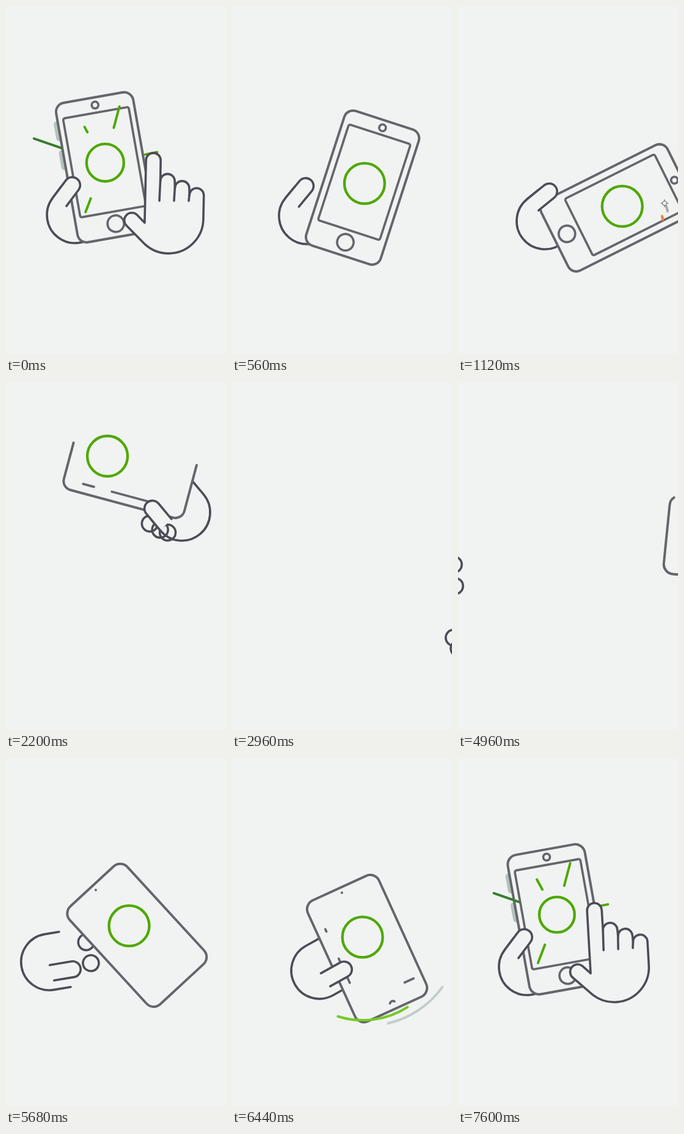
These frames come from a looping animation (360x568 px, 7640 ms). An HTML page with a canvas:

```html
<!DOCTYPE html>
<html>
<head>
<meta charset="utf-8">
<style>
html, body { margin: 0; width: 100%; height: 100%; overflow: hidden; background: #f0f3f2; }
canvas { display: block; }
</style>
</head>
<body>
<canvas id="stage" width="360" height="568"></canvas>
<script>
const ctx = document.getElementById('stage').getContext('2d');
const LOOP = 7640, RAD = Math.PI / 180;
const BG = '#f0f3f2', BODY = '#65666c', SKIN = '#4c4d57', GREEN = '#4fa800', LIME = '#76c926',
  FOREST = '#397d2d', ORANGE = '#f37f2c', MIST = '#d9e2de', SAGE = '#a4b5b0', ASH = '#c3cdc9';
const clamp = (v, a, b) => Math.max(a, Math.min(b, v));
const mix = (a, b, p) => a + (b - a) * p;
const ramp = (u, a, b) => { const p = clamp((u - a) / (b - a), 0, 1); return p * p * (3 - 2 * p); };

// Time runs from -4640 to 3000 with the tap near zero.
// Poses are [time, x, y, degrees], joined by monotone cubics.
const phonePoses = [[-2840, 560, 255, -95], [-2680, 450, 259, -84.3], [-1940, 214, 290, -42],
  [-1200, 221, 311, -24.6], [-500, 160, 263.3, -11.5], [0, 162.6, 263.3, -10],
  [1120, 261.6, 329.4, 63.4], [1600, 225, 160, 98], [2200, 206, 137, 105]];
const gripPoses = [[-2840, -130, 325, 0], [-2680, -72, 320, 0], [-1200, 143, 347, -29],
  [-500, 113, 341, -53], [200, 113, 341, -53], [1120, 142, 351, -39], [1600, -80, 436, -10]];

function at(keys, u) {
  const end = keys.length - 1;
  if (u <= keys[0][0]) return keys[0].slice(1);
  if (u >= keys[end][0]) return keys[end].slice(1);
  let i = 0;
  while (u >= keys[i + 1][0]) i++;
  const a = keys[i], b = keys[i + 1], h = b[0] - a[0], p = (u - a[0]) / h;
  const secant = (j, c) => (keys[j + 1][c] - keys[j][c]) / (keys[j + 1][0] - keys[j][0]);
  const slope = (j, c) => {
    if (j === 0 || j === end) return 0;
    const m = secant(j - 1, c), n = secant(j, c);
    return m * n <= 0 ? 0 : 2 * m * n / (m + n);
  };
  return a.slice(1).map((v, k) => {
    const c = k + 1, q = p * p, r = q * p;
    return (2 * r - 3 * q + 1) * v + (r - 2 * q + p) * h * slope(i, c) +
      (3 * q - 2 * r) * b[c] + (r - q) * h * slope(i + 1, c);
  });
}

function pen(color, width) { ctx.strokeStyle = color; ctx.lineWidth = width; }
function place(x, y, deg, draw) {
  ctx.save();
  ctx.translate(x, y);
  ctx.rotate(deg * RAD);
  draw();
  ctx.restore();
}
function line(x0, y0, x1, y1) {
  ctx.beginPath();
  ctx.moveTo(x0, y0);
  ctx.lineTo(x1, y1);
  ctx.stroke();
}
function disc(x, y, r, fill) {
  ctx.beginPath();
  ctx.arc(x, y, r, 0, 7);
  if (fill) { ctx.fillStyle = fill; ctx.fill(); } else ctx.stroke();
}
function box(w, h, r) {
  ctx.beginPath();
  ctx.roundRect(-w / 2, -h / 2, w, h, r);
}
function solid() { ctx.fillStyle = BG; ctx.fill(); ctx.stroke(); }

// Strokes the closed outline between two distances along it
function outline(w, h, r, from, to) {
  const around = 2 * (w + h) - 8 * r + 2 * Math.PI * r, len = to - from;
  box(w, h, r);
  ctx.fillStyle = BG;
  ctx.fill();
  if (len < around) {
    ctx.setLineDash([len, around - len]);
    ctx.lineDashOffset = -from;
  }
  ctx.stroke();
  ctx.setLineDash([]);
}

// The screen frame grows out of these marks: side, middle, half length
const marksIn = [['L', -55, 2], ['L', -2, 2], ['L', 35, 4], ['B', 43, 10], ['R', 0, -12], ['T', 0, -20]];
const marksOut = [['R', 64, 13], ['R', -10, 31], ['L', 0, -30], ['B', 0, -30], ['T', 0, -30]];

function screen(u, sx, top, base) {
  const g = u < 0 ? (u + 1200) / 4.5 : (2200 - u) / 10;
  if (g >= 90) {
    ctx.beginPath();
    ctx.roundRect(-sx, top, 2 * sx, base - top, 3);
    ctx.stroke();
    return;
  }
  for (const [side, mid, half] of u < 0 ? marksIn : marksOut) {
    const upright = side === 'L' || side === 'R';
    const a = Math.max(mid - half - g, upright ? top : -sx);
    const b = Math.min(mid + half + g, upright ? base : sx);
    if (b <= a) continue;
    const edge = { L: -sx, R: sx, T: top, B: base }[side];
    if (upright) line(edge, a, edge, b); else line(a, edge, b, edge);
  }
}

function phone(u, [x, y, deg]) {
  const ready = ramp(u, -1200, -700), leave = clamp(u / 2200, 0, 1), gone = ramp(u, 1150, 1500);
  const h = mix(217, 231, ready) - 27 * ramp(u, 1120, 2200);
  place(x, y, deg, () => {
    const out = ramp(u, -760, -560) * (1 - ramp(u, 60, 360));
    if (out > 0) {
      ctx.fillStyle = '#b3c2bd';
      for (const top of [-88, -40]) {
        ctx.beginPath();
        ctx.roundRect(-63 - 8 * out, top, 14, 33, 5);
        ctx.fill();
      }
    }
    pen(BODY, 4);
    const half = 0.3 * (2800 - u);
    if (u < 0) outline(128, h, 16, 110 - mix(330, 720, ramp(u, -2680, -2300)), 110);
    else outline(128, h, 15, 200 - half, 200 + half);

    pen(BODY, 3.7);
    screen(u, 49 + 5.5 * ready - 5.5 * leave, -90.5 - 4 * leave, 76 - 2.5 * ready - 4 * ramp(u, 0, 2200));

    const homeR = mix(5, 13.5, ready) * (1 - gone);
    if (u > -1250 && homeR > 0.5) {
      const sweep = mix(55, 180, ready) * RAD;
      ctx.beginPath();
      ctx.arc(0.8, mix(100, 93.5, ready), homeR, -Math.PI / 2 - sweep, -Math.PI / 2 + sweep);
      ctx.stroke();
    }
    const camR = mix(2, 5.5, ready) * ramp(u, -2300, -2100) * (1 - gone);
    if (camR > 2.5) disc(1, -103, camR);
    else if (camR > 0) disc(0.5, -100, camR, BODY);
  });
}

// Rides on the phone, is thrown up, then drops away
function ring(u, [px, py, deg]) {
  const c = Math.cos(deg * RAD), s = Math.sin(deg * RAD);
  const ly = mix(-20, -7.5, ramp(u, -1200, -600));
  const thrown = ramp(u, 1120, 1800), drop = ramp(u, 2500, 2960);
  const x = mix(mix(px + c - s * ly, 166, thrown), 60, drop);
  const y = mix(mix(py + s + c * ly, 121, thrown), 393, drop);
  const tap = 4.2 * Math.exp(-(((u + 50) / 70) ** 2));
  const r = 33 * ramp(u, -2350, -2100) * (1 - drop) - tap;
  if (r > 0.5) { pen(GREEN, 4.3); disc(x, y, r); }
}

// Palm and fingers lie behind the phone, the thumb in front.
function palm([x, y, deg], fingers) {
  place(x, y, deg, () => {
    pen(SKIN, 3.6);
    ctx.beginPath();
    ctx.moveTo(24, -46);
    ctx.arc(0, 0, 46, -Math.PI / 2, Math.PI / 2, true);
    ctx.lineTo(28, 46);
    for (const [fx, fy] of fingers) {
      ctx.moveTo(fx + 13, fy);
      ctx.arc(fx, fy, 13, 0, 7);
    }
    ctx.stroke();
  });
}
function thumb([x, y, deg], n) {
  place(x, y, deg, () => {
    pen(SKIN, 3.6);
    ctx.beginPath();
    ctx.moveTo(0, -n - 13);
    ctx.lineTo(36, -n - 13);
    ctx.arc(36, -n, 13, -Math.PI / 2, Math.PI / 2);
    ctx.lineTo(3, -n + 13);
    solid();
  });
}
const reach = [[65, -22], [67, 13]];
const curl = [[-10, -39], [1.5, -45.6], [20, -52]];

function pointer(u) {
  const d = Math.max(0, u + 60), lift = 1 - ramp(u, -700, -60), size = ramp(u, -940, -700);
  const x = 191 + 45 * lift + 0.22 * d + 0.0004 * d * d;
  const y = 349 + 55 * lift + 0.0002 * d * d;
  const deg = -7 + 12 * lift + 40 * (1 - Math.exp(-d / 310));
  if (size < 0.02 || x > 425) return;
  place(x, y, deg, () => {
    ctx.translate(60, 0);
    ctx.scale(size, size);
    ctx.translate(-60, 0);
    pen(SKIN, 3.6);
    ctx.beginPath();
    ctx.moveTo(21, 4);
    ctx.lineTo(23, -98);
    ctx.arc(35, -98, 12, Math.PI, 0);
    for (let i = 0; i < 3; i++) ctx.arc(58.3 + 23.8 * i, -64 + 11.5 * i, 11.8, Math.PI, 0);
    ctx.arc(60, -3, 57, 0, 132 * RAD);
    ctx.arc(0, 0, 12.3, 130 * RAD, 311 * RAD);
    ctx.closePath();
    solid();
    for (let i = 0; i < 3; i++) line(46.5 + 23.8 * i, -65 + 11.5 * i, 45 + 24 * i, -32);
  });
}

// Rays round the ring: angle, tail and head radius at the tap, head speed
const rays = [[-75, 49, 87, 8, GREEN], [-119, 47, 66, 1, GREEN], [111, 52, 84, 2, GREEN],
  [-11.5, 58, 86, 2, GREEN], [199, 64, 108, 13.6, FOREST]];

function burst(u) {
  const k = (u + 40) / 40, born = clamp((k + 6) / 6, 0, 1);
  if (k < -6 || k > 12) return;
  for (const [deg, inner, outer, speed, color] of rays) {
    const head = mix(40, Math.min(outer + speed * k, 137), born), tail = Math.max(40, inner + 10 * k);
    if (head <= tail) continue;
    pen(color, 4);
    place(161, 256, deg, () => line(tail, 0, head, 0));
  }
}

// Short strokes that draw on before the moment and off after it
const swingDashes = [[334, 343, 335, 349, ORANGE], [341, 327, 343, 335, '#a5a8a8']];
const keyDashes = [[1, 307, 3, 351, LIME], [176, 333, 180, 332, LIME], [196, 344, 242, 323, LIME],
  [196, 365, 212, 358, ORANGE], [205, 376, 234, 363, ASH], [230, 369, 302, 318, MIST], [107, 271, 195, 255, MIST]];

function dashes(list, u, moment) {
  const head = ramp(u, moment - 240, moment - 20), tail = ramp(u, moment + 20, moment + 400);
  if (head <= tail) return;
  for (const [x0, y0, x1, y1, color] of list) {
    pen(color, 4);
    line(mix(x0, x1, tail), mix(y0, y1, tail), mix(x0, x1, head), mix(y0, y1, head));
  }
}

function sight(x, y) {
  pen('#55565c', 1);
  disc(x, y, 3.6);
  for (let i = 0; i < 4; i++) place(x, y, 90 * i, () => line(3.6, 0, 6, 0));
}

const roads = [
  ['M0 203 L140 188 Q175 184 195 160 L242 97', 285, MIST],
  ['M0 248 L212 224 Q218 223 224 223 L362 223', 370, SAGE],
  ['M305 130 L256 163.5 C244 172 249 187 262 187 L353 187', 200, BODY]
].map(([d, len, color]) => ({ path: new Path2D(d), len, color }));

function car(u) {
  const head = ramp(u, -4350, -3950), tail = ramp(u, -3720, -3050);
  if (head <= tail) return;
  for (const { path, len, color } of roads) {
    pen(color, 4);
    ctx.setLineDash([len * (head - tail), 999]);
    ctx.lineDashOffset = -len * tail;
    ctx.stroke(path);
  }
  ctx.setLineDash([]);
}

const fist = new Path2D('M25 393 A12.5 12.5 0 0 1 21 369 L111 332.8 A47.5 47.5 0 0 1 150.5 418.8 L127 427 ' +
  'L127 438 A13.3 13.3 0 0 1 100.5 436 L97 441 A14 14 0 0 1 70 433 L56 434');
const folds = new Path2D('M7 376 L14 378 M110 411 L100 436 M78 414 L69 434 M70 420 L56 434');
const hold = new Path2D('M115 367 L81 384 A14.3 14.3 0 0 0 94 409 L130 390 Q134 399 143 399');

function keyHand(u) {
  const away = 1 - ramp(u, -4640, -4300) + ramp(u, -3300, -2850);
  if (away >= 1) return;
  place(-190 * away, 0, 0, () => {
    pen(SKIN, 3.8);
    ctx.fillStyle = BG;
    ctx.fill(fist);
    ctx.stroke(fist);
    ctx.stroke(folds);
    place(60, 393.5, -30, () => { pen('#a9abab', 4.5); box(75, 55, 26); solid(); });
    pen(BODY, 4);
    place(48.5, 398.5, -28, () => { box(27, 41, [13, 12, 4, 13]); solid(); });
    place(75, 386, -28, () => { box(29, 41, [10, 13, 13, 4]); solid(); });
    pen(SKIN, 3.8);
    ctx.fill(hold);
    ctx.stroke(hold);
  });
}

function swoosh(x, y, r, from, to, color) {
  if (to <= from) return;
  pen(color, 4);
  ctx.beginPath();
  ctx.arc(x, y, r, from * RAD, to * RAD);
  ctx.stroke();
}

function paint(t) {
  const u = t >= 3000 ? t - LOOP : t;
  ctx.fillStyle = BG;
  ctx.fillRect(0, 0, 360, 568);
  ctx.lineCap = ctx.lineJoin = 'round';

  car(u);
  keyHand(u);
  dashes(keyDashes, u, -3840);
  if (Math.abs(u + 3840) < 150) sight(189, 365);

  const pose = at(phonePoses, u);
  const grip = u > -2840 && u < 1600 && at(gripPoses, u);
  const away = 1 - ramp(u, 1640, 2200) + ramp(u, 2400, 3000);
  const grab = away < 1 && [288 + 130 * away, 213 + 222 * away, -130 + 35 * away];
  if (grip) palm(grip, u < -1300 ? reach : []);
  if (grab) palm(grab, curl);
  if (u > -2840 && u < 2800) phone(u, pose);
  ring(u, pose);
  if (grip) thumb(grip, mix(-18, 33, ramp(u, -1200, -500)));
  if (grab) thumb(grab, 33);

  const k = (u + 1200) / 40;
  swoosh(214, 292, 136, clamp(57 + 14 * k, 38, 125), clamp(107 + 18 * k, 38, 125), LIME);
  swoosh(221, 285, 152, clamp(35.5 + 12 * k, 28, 98), clamp(76.6 + 10 * k, 28, 98), ASH);

  burst(u);
  dashes(swingDashes, u, 1120);
  if (Math.abs(u - 1120) < 100) sight(338, 322);
  pointer(u);
}

const begin = performance.now();
function tick() {
  paint((performance.now() - begin) % LOOP);
  requestAnimationFrame(tick);
}
tick();
</script>
</body>
</html>
```
